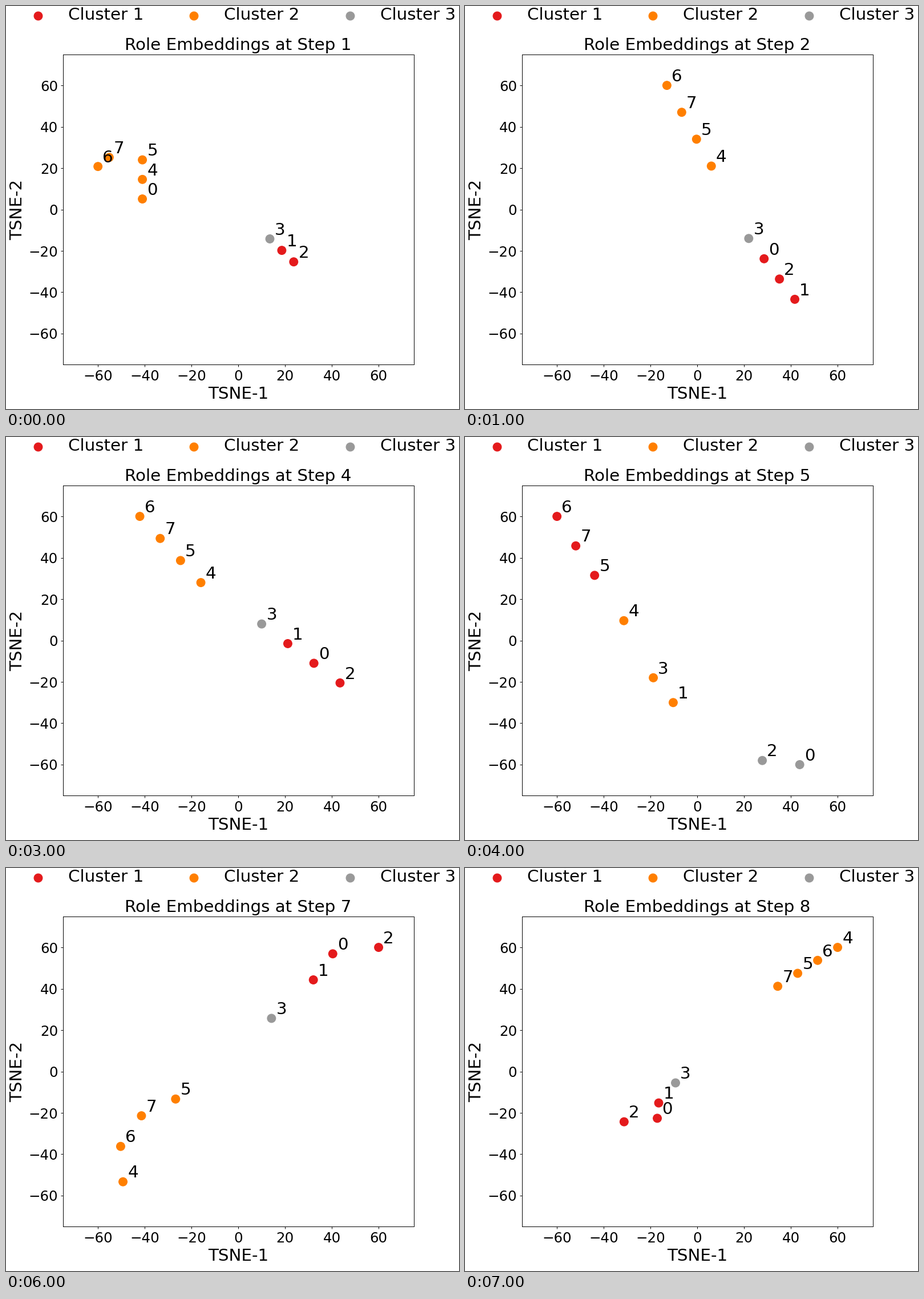
Write a matplotlib script that moves like this. It is 794 px wide and 706 px high and loops after 8 s.

```python
import matplotlib.pyplot as plt
import numpy as np
from matplotlib.animation import FuncAnimation

W, H, DPI = 794, 706, 64
K = W / 9 / DPI         # point scale: the layout is 9 by 8 inches
COLORS = {"r": "#e41a1c", "o": "#ff7f00", "g": "#999999"}
USUAL = "rrrgoooo"      # clusters of roles 0 to 7

# Each step: clusters, then chains of roles spread evenly from start to end
STEPS = [
    ("orrgoooo", [("67", (-60, 20.8), (-55.2, 25.2)),
                  ("540", (-41, 24), (-41, 5.1)),
                  ("312", (13.5, -14.2), (23.7, -25.3))]),
    (USUAL, [("6754", (-13, 60), (6, 21)),
             ("3021", (22, -14), (41.7, -43.4))]),
    ("rrgrrooo", [("7654", (-26.2, 32.9), (3.8, 4)),
                  ("32", (11.4, -11.5), (60, -16.4)),
                  ("01", (44.2, -0.6), (44, -14))]),
    (USUAL, [("6754", (-42.1, 60), (-16, 28)),
             ("3102", (10, 8), (43.5, -20.5))]),
    ("gogoorrr", [("675", (-60, 60), (-43.9, 31.5)),
                  ("43", (-31.4, 9.6), (-18.8, -18)),
                  ("12", (-10.3, -30), (27.8, -58)),
                  ("0", (43.8, -60), (43.8, -60))]),
    ("grgroooo", [("02", (-60, -48.6), (-42, -53.9)),
                  ("13", (5.8, -46.8), (24.7, -42.1)),
                  ("45", (20, 26.1), (20.2, 41.9)),
                  ("76", (14.5, 54.3), (34.9, 60))]),
    (USUAL, [("46", (-49.3, -53.3), (-50.3, -36.2)),
             ("75", (-41.4, -21.4), (-26.8, -13.3)),
             ("31", (14.2, 25.7), (32.1, 44.3)),
             ("02", (40.4, 56.9), (60, 60))]),
    (USUAL, [("7564", (34.4, 41.2), (60, 60)),
             ("31", (-9.3, -5.5), (-16.5, -15.2)),
             ("02", (-17.1, -22.6), (-31.3, -24.3))]),
]

plt.rcParams.update({
    "font.family": "DejaVu Sans",
    "axes.linewidth": 0.8 * K,
    "axes.titlepad": 6 * K,
    "axes.labelpad": 4 * K,
    "axes.titlesize": 24 * K,
    "axes.labelsize": 24 * K,
    "legend.fontsize": 24 * K,
})
for axis in ("xtick", "ytick"):
    plt.rcParams.update({
        f"{axis}.labelsize": 20 * K,
        f"{axis}.major.size": 3.5 * K,
        f"{axis}.major.pad": 3.5 * K,
        f"{axis}.major.width": 0.8 * K,
    })


def place(chains):
    """Positions of all roles, in role order."""
    xy = np.zeros((8, 2))
    for roles, start, end in chains:
        xy[[int(r) for r in roles]] = np.linspace(start, end, len(roles))
    return xy


fig = plt.figure(figsize=(W / DPI, H / DPI), dpi=DPI, facecolor="white")
ax = fig.add_axes([113 / 900, 0.11, 697 / 900, 0.77])
ax.set(xlim=(-75, 75), ylim=(-75, 75), xlabel="TSNE-1", ylabel="TSNE-2")
ax.set_xticks(range(-60, 61, 20))
ax.set_yticks(range(-60, 61, 20))
title = ax.set_title("")

dot = dict(s=(12 * K) ** 2, linewidths=K)
for i, color in enumerate(COLORS.values(), 1):
    ax.scatter([], [], color=color, label=f"Cluster {i}", **dot)
ax.legend(loc="upper center", bbox_to_anchor=(0.5, 1.2), ncol=3,
          frameon=False)

points = ax.scatter(np.zeros(8), np.zeros(8), **dot)
labels = [ax.text(0, 0, str(i), fontsize=24 * K) for i in range(8)]


def update(step):
    clusters, chains = STEPS[step]
    xy = place(chains)
    title.set_text(f"Role Embeddings at Step {step + 1}")
    points.set_offsets(xy)
    points.set_color([COLORS[c] for c in clusters])
    for label, pos in zip(labels, xy):
        label.set_position(pos + 2)
    return [title, points, *labels]


anim = FuncAnimation(fig, update, frames=len(STEPS), interval=1000,
                     repeat=True, repeat_delay=0, blit=False)
plt.show()
```
